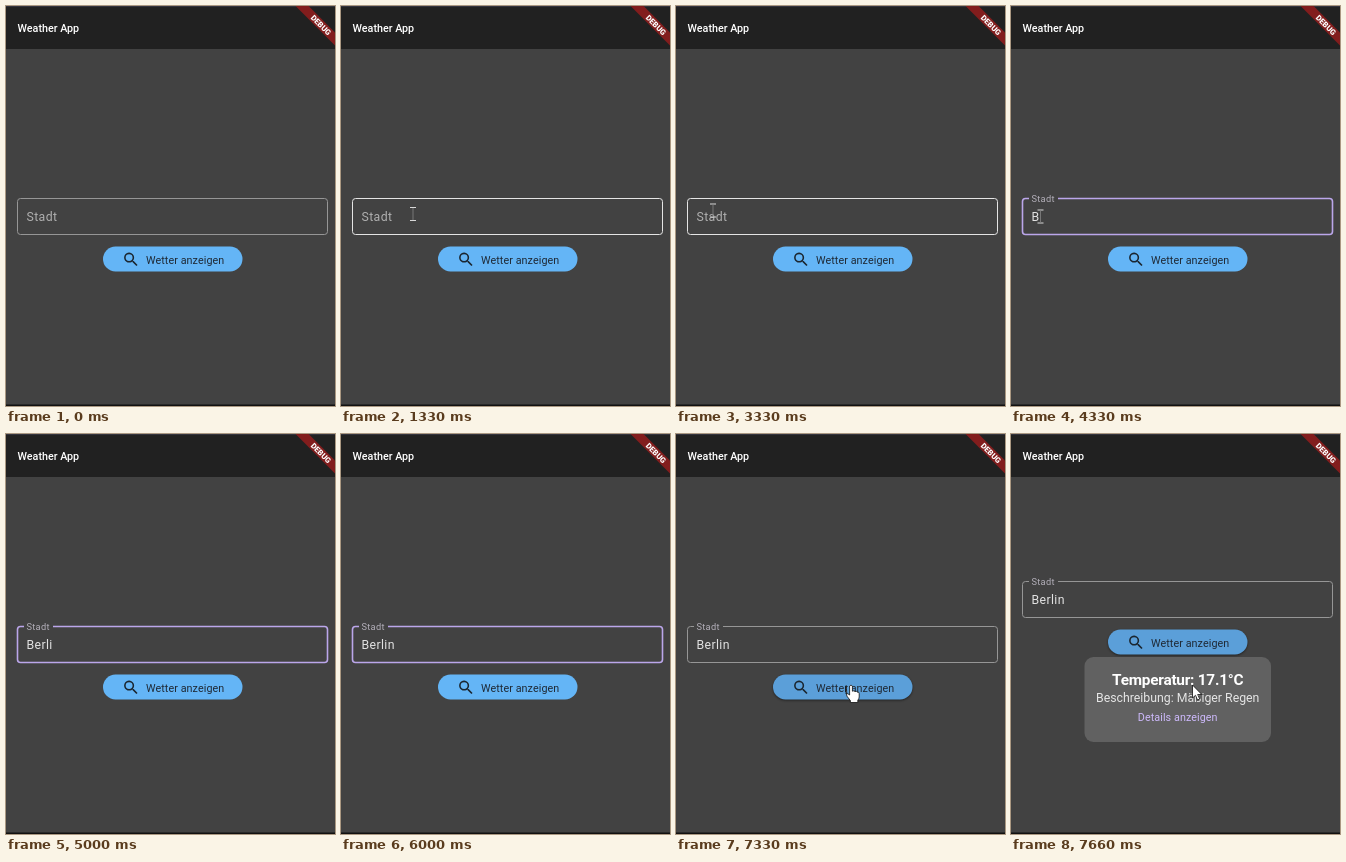
Write an HTML page that moves like this. It is 329 px wide and 400 px high and loops after 8 s.

```html
<!DOCTYPE html>
<html lang="de">
<head>
<meta charset="utf-8">
<title>Weather App</title>
<style>
  html, body { margin: 0; width: 100%; height: 100%; overflow: hidden; background: #424242; }
  svg { display: block; width: 329px; height: 400px; font-family: Roboto, sans-serif; }
  .hidden { visibility: hidden; }
  .small { font-size: 10.75px; }
  .field { font-size: 12.3px; letter-spacing: .38px; }
  .float { font-size: 9.25px; letter-spacing: .28px; }
  #frame { fill: none; stroke: #969696; stroke-width: 1; }
  #frame.hover { stroke: #e4e4e4; }
  #frame.focus { stroke: #bba6ea; stroke-width: 1.6; }
  #pill { fill: #64b5f6; }
  #pill.hover { fill: #5b9fd9; filter: drop-shadow(0 1px 1px #0007); }
</style>
</head>
<body>
<svg viewBox="0 0 329 400">
  <rect width="329" height="400" fill="#424242"/>
  <rect width="329" height="43" fill="#212121"/>
  <rect width="329" height="1" fill="#34343e"/>
  <rect y="398.5" width="329" height="1.5" fill="#111"/>
  <text class="small" x="11.5" y="26" font-weight="500" fill="#fff">Weather App</text>

  <g transform="translate(333.5 .5) rotate(45)">
    <rect x="-31" y="21.5" width="62" height="9.3" fill="#821d1d"/>
    <text y="29" text-anchor="middle" font-size="7.8" font-weight="900" fill="#fff">DEBUG</text>
  </g>

  <g id="form">
    <rect id="frame" x="11.5" y="192.5" width="310" height="36" rx="3"/>
    <text id="hint" class="field" x="20.5" y="215" fill="#b0b0b0">Stadt</text>
    <g id="label">
      <rect x="18" y="190" width="29" height="5" fill="#424242"/>
      <text class="float" x="20.5" y="196" fill="#b4b0ba">Stadt</text>
    </g>
    <text id="city" class="field" x="20.5" y="215" fill="#e2e2e2"></text>
    <rect id="caret" y="203" width="1.5" height="15" fill="#c8b4f8"/>

    <rect id="pill" x="97" y="240.5" width="139.5" height="25" rx="12.5"/>
    <path transform="translate(115.8 244.3) scale(.77)" fill="#1b2630"
      d="M15.5 14h-.79l-.28-.27A6.5 6.5 0 1 0 13.73 14.43l.27.28v.79l5 4.99L20.49 19zM9.5 14a4.5 4.5 0 1 1 0-9 4.5 4.5 0 0 1 0 9z"/>
    <text class="small" x="140" y="257.5" letter-spacing=".08" fill="#1f2a36">Wetter anzeigen</text>
  </g>

  <g id="card" text-anchor="middle">
    <rect x="73.5" y="223" width="186.5" height="85" rx="9" fill="#616161"/>
    <text x="166.7" y="250.5" font-size="15.4" font-weight="700" letter-spacing="-.25" fill="#fff">Temperatur: 17.1°C</text>
    <text x="166.7" y="267.5" font-size="12.3" fill="#e6e6e6">Beschreibung: Mäßiger Regen</text>
    <text class="small" x="166.7" y="287" letter-spacing=".08" fill="#cdb9fb">Details anzeigen</text>
  </g>

  <g id="beam" fill="none" stroke="#d8d8d8">
    <path d="M-3-6.5H3M-3 6.5H3"/>
    <path d="M0-6V6" stroke="#777"/>
  </g>
  <path id="arrow" fill="#fff" stroke="#111" stroke-width=".8"
    d="M0 0V13L3 10.3 5 15 7.2 14 5.2 9.5H9.3Z"/>
  <path id="hand" fill="#fff" stroke="#111" stroke-width=".8" stroke-linejoin="round"
    d="M-1.4 1Q0-.8 1.4 1V6.2Q3 5.2 4 6.6 5.6 5.8 6.4 7.2 8.2 6.8 8.2 8.6V12Q8 14 6.8 15.2V17.5H-.6V15.6L-4.2 11Q-5-9-5 9-3.8 7.4-1.4 10Z"/>
</svg>
<script>
  const $ = id => document.getElementById(id);
  const LOOP = 8000;
  const base = { border: '', text: '', caret: 0, pill: '', cursor: '', x: 0, y: 0, result: false };
  const beam = (x, y) => ({ cursor: 'beam', x, y });

  // Each entry: start time and what changes then
  const steps = [
    [660, { border: 'hover' }],
    [1000, beam(72, 208)],
    [1660, beam(29, 208)],
    [2330, beam(17, 206)],
    [2660, { cursor: '' }],
    [3330, beam(37, 204.5)],
    [3660, { border: 'focus', ...beam(29.5, 210.5) }],
    [4000, { caret: 20.5 }],
    [4330, { text: 'B', caret: 0 }],
    [4660, { text: 'Ber', cursor: '' }],
    [5000, { text: 'Berli' }],
    [5330, { text: 'Berlin', caret: 54.5 }],
    [5660, { caret: 0 }],
    [6330, { caret: 54.5 }],
    [6660, { caret: 0, cursor: 'arrow', x: 176, y: 232 }],
    [7000, { pill: 'hover', cursor: 'hand', x: 175, y: 251 }],
    [7330, { border: '' }],
    [7660, { result: true, cursor: 'arrow', x: 181.5, y: 251 }]
  ];

  const show = (id, on) => $(id).classList.toggle('hidden', !on);

  function render(t) {
    const s = Object.assign({}, base, ...steps.filter(([at]) => at <= t).map(([, change]) => change));
    const raised = s.border === 'focus' || s.text !== '';
    $('frame').setAttribute('class', s.border);
    $('pill').setAttribute('class', s.pill);
    $('city').textContent = s.text;
    $('caret').setAttribute('x', s.caret);
    $('form').setAttribute('transform', `translate(0 ${s.result ? -45 : 0})`);
    show('hint', !raised);
    show('label', raised);
    show('caret', s.caret);
    show('card', s.result);
    for (const id of ['beam', 'arrow', 'hand']) {
      show(id, s.cursor === id);
      $(id).setAttribute('transform', `translate(${s.x} ${s.y})`);
    }
  }

  const start = performance.now();
  function tick(now) {
    render(Math.max(0, now - start) % LOOP);
    requestAnimationFrame(tick);
  }
  render(0);
  requestAnimationFrame(tick);
</script>
</body>
</html>
```
